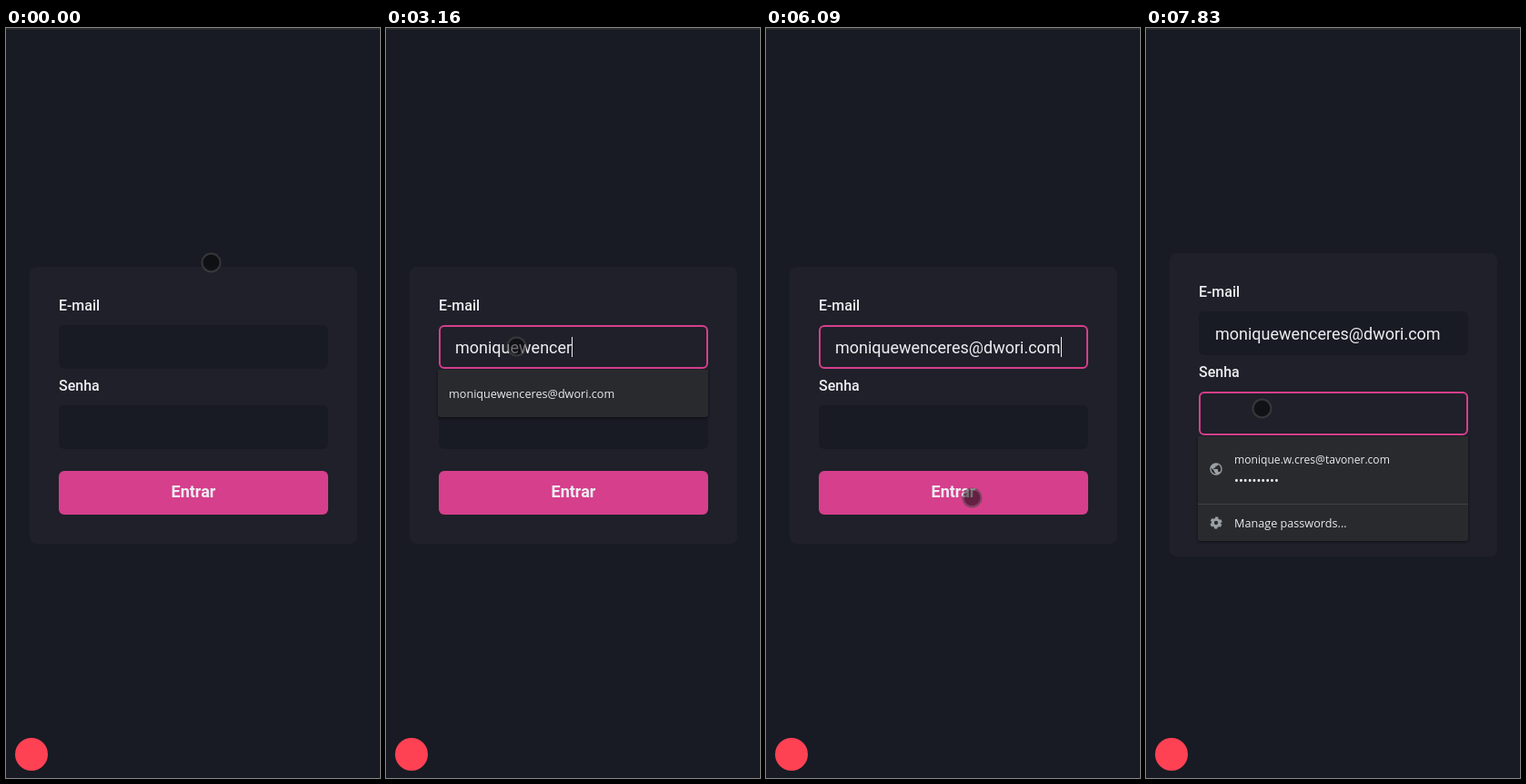
Write an HTML page that moves like this. It is 411 by 823 pixels and loops after 8 s.

```html
<!DOCTYPE html>
<html lang="pt">
<head>
<meta charset="utf-8">
<title>Login</title>
<style>
  html, body { margin: 0; width: 100%; height: 100%; overflow: hidden; background: #181b23; }
  body { position: relative; color: #eeeef2; font-family: Roboto, sans-serif; }
  div, svg { position: absolute; box-sizing: border-box; }
  .edge { left: 0; top: 0; width: 100%; height: 2px; background: #292a2d; }
  .badge { left: 10px; top: 779px; width: 36px; height: 36px; border-radius: 50%; background: #ff4154; }
  .card { left: 26px; width: 360px; border-radius: 8px; background: #1f2029; }
  .label { left: 58px; height: 24px; font: 500 16px/24px Roboto, sans-serif; white-space: nowrap; }
  .field { left: 58px; width: 296px; height: 48px; padding-left: 16px; border: 2px solid; border-radius: 6px;
    display: flex; align-items: center; font-size: 18px; white-space: pre; }
  .caret { width: 1px; height: 22px; background: #eeeef2; }
  .error { left: 58px; top: 455px; font-size: 14px; line-height: 20px; color: #e53e3e; white-space: nowrap; }
  .button { left: 58px; width: 296px; height: 48px; border-radius: 6px; text-align: center;
    font: 700 18px/46px Roboto, sans-serif; }
  .popup { left: 57px; width: 297px; background: #292a2d; border-radius: 0 0 3px 3px;
    box-shadow: 0 1px 3px rgba(0, 0, 0, .5); color: #e8eaed; font: 12.65px/20px "Open Sans", sans-serif; }
  .popup div { white-space: nowrap; }
  .popup .mail { left: 40px; top: 16px; font-size: 12.1px; }
  .popup .dots { left: 40px; top: 38px; font-size: 13px; }
  .popup .line { left: 0; top: 74px; width: 100%; height: 1px; background: #404245; }
  .popup .manage { left: 40px; top: 85px; }
  .popup .hint { left: 12px; top: 16px; }
  .popup svg { left: 12px; width: 16px; height: 16px; }
  .cursor { left: -11px; top: -11px; width: 22px; height: 22px; border-radius: 50%;
    background: rgba(8, 8, 8, .55); border: 2px solid rgba(72, 72, 72, .6); background-clip: padding-box; }
</style>
</head>
<body>
  <div class="edge"></div>
  <div class="card" id="card"></div>
  <div class="label" id="mailLabel">E-mail</div>
  <div class="field" id="mailField"><span id="typed"></span><span class="caret" id="mailCaret"></span></div>
  <div class="label" id="passLabel">Senha</div>
  <div class="field" id="passField"><span class="caret" id="passCaret"></span></div>
  <div class="error" id="error">Senha obrigatória</div>
  <div class="button" id="button">Entrar</div>

  <div class="popup" id="saved" style="height:115px">
    <svg viewBox="0 0 24 24" style="top:28px" fill="#9aa0a6"><path d="M12 2C6.48 2 2 6.48 2 12s4.48 10 10 10 10-4.48 10-10S17.52 2 12 2zm-1 17.93c-3.95-.49-7-3.85-7-7.93 0-.62.08-1.21.21-1.79L9 15v1c0 1.1.9 2 2 2v1.93zm6.9-2.54c-.26-.81-1-1.39-1.9-1.39h-1v-3c0-.55-.45-1-1-1H8v-2h2c.55 0 1-.45 1-1V7h2c1.1 0 2-.9 2-2v-.41c2.93 1.19 5 4.06 5 7.41 0 2.08-.8 3.97-2.1 5.39z"/></svg>
    <div class="mail">monique.w.cres@tavoner.com</div>
    <div class="dots">••••••••••</div>
    <div class="line"></div>
    <svg viewBox="0 0 24 24" style="top:87px" fill="none" stroke="#9aa0a6">
      <circle cx="12" cy="12" r="5.5" stroke-width="4.5"/>
      <circle cx="12" cy="12" r="8.4" stroke-width="3" stroke-dasharray="4.9 3.9" transform="rotate(14 12 12)"/>
    </svg>
    <div class="manage">Manage passwords...</div>
  </div>
  <div class="popup" id="suggest" style="top:375px;height:52px">
    <div class="hint" id="hint"></div>
  </div>

  <div class="badge"></div>
  <div class="cursor" id="cursor"></div>

<script>
(() => {
  const LOOP = 8000;
  const EMAIL = 'moniquewenceres@dwori.com';
  const KEYS = [1300, 1420, 1650, 1760, 1880, 2040, 2110, 2410, 2510, 2760, 2850, 2930, 3160,
    3280, 3450, 3620, 3950, 4070, 4180, 4300, 4460, 4620, 4720, 4820, 4980];
  const FOCUS = 440, SUBMIT = 6330;
  // time, x, y
  const PATH = [
    [0, 225, 257], [29, 225, 257], [30, 168, 335], [99, 168, 335], [100, 116, 384],
    [260, 116, 384], [420, 143, 349], [5480, 143, 349], [5670, 225, 511], [5970, 225, 511],
    [6090, 226, 515], [6480, 226, 515], [6630, 191, 483], [7110, 127, 417], [LOOP, 127, 417]
  ];
  const PINK = [213, 63, 140], DARK_PINK = [184, 50, 128], CARD = [31, 32, 41], INPUT = [24, 27, 35];

  const el = {};
  document.querySelectorAll('[id]').forEach(node => { el[node.id] = node; });
  el.hint.textContent = EMAIL;

  const ramp = (t, from, length) => Math.min(1, Math.max(0, (t - from) / length));
  const mix = (a, b, k) => a + (b - a) * k;
  const color = (a, b, k) => `rgb(${a.map((v, i) => Math.round(mix(v, b[i], k)))})`;
  const within = (t, from, to) => t >= from && t < to;
  const show = (node, on) => { node.style.visibility = on ? 'visible' : 'hidden'; };
  const setTop = (node, y) => { node.style.top = y + 'px'; };
  const blink = (t, from) => Math.floor((t - from) / 500) % 2 === 0;

  function cursorAt(t) {
    const i = PATH.findIndex(p => p[0] > t);
    const [t0, x0, y0] = PATH[i - 1], [t1, x1, y1] = PATH[i];
    const k = (t - t0) / (t1 - t0);
    return [mix(x0, x1, k), mix(y0, y1, k)];
  }

  function paintField(node, focus) {
    node.style.background = color(INPUT, CARD, focus);
    node.style.borderColor = color(INPUT, PINK, focus);
  }

  // The error line makes the centred card taller.
  function layout(failed) {
    const up = failed ? 15 : 0;
    setTop(el.card, 262 - up);
    el.card.style.height = (failed ? 333 : 304) + 'px';
    setTop(el.mailLabel, 293 - up);
    setTop(el.mailField, 326 - up);
    setTop(el.passLabel, 381 - up);
    setTop(el.passField, 414 - up);
    setTop(el.button, failed ? 500 : 486);
    show(el.error, failed);
  }

  function render(t) {
    const failed = t >= SUBMIT;
    layout(failed);

    const count = KEYS.filter(k => k <= t).length;
    el.typed.textContent = EMAIL.slice(0, count);
    show(el.mailCaret, within(t, FOCUS, SUBMIT) && blink(t, count ? KEYS[count - 1] : FOCUS));
    show(el.passCaret, failed && blink(t, SUBMIT));

    const leave = ramp(t, SUBMIT, 200);
    paintField(el.mailField, ramp(t, FOCUS, 180) - leave);
    paintField(el.passField, leave);
    el.button.style.background = color(PINK, DARK_PINK, ramp(t, 6320, 180) - ramp(t, 6640, 200));

    setTop(el.saved, failed ? 448 : 375);
    show(el.saved, within(t, 560, 2460) || t >= 7260);
    show(el.suggest, within(t, 2560, 5010));

    const [x, y] = cursorAt(t);
    el.cursor.style.transform = `translate(${x + .5}px, ${y + .5}px)`;
  }

  const begin = performance.now();
  function tick() {
    render((performance.now() - begin) % LOOP);
    requestAnimationFrame(tick);
  }
  tick();
})();
</script>
</body>
</html>
```
